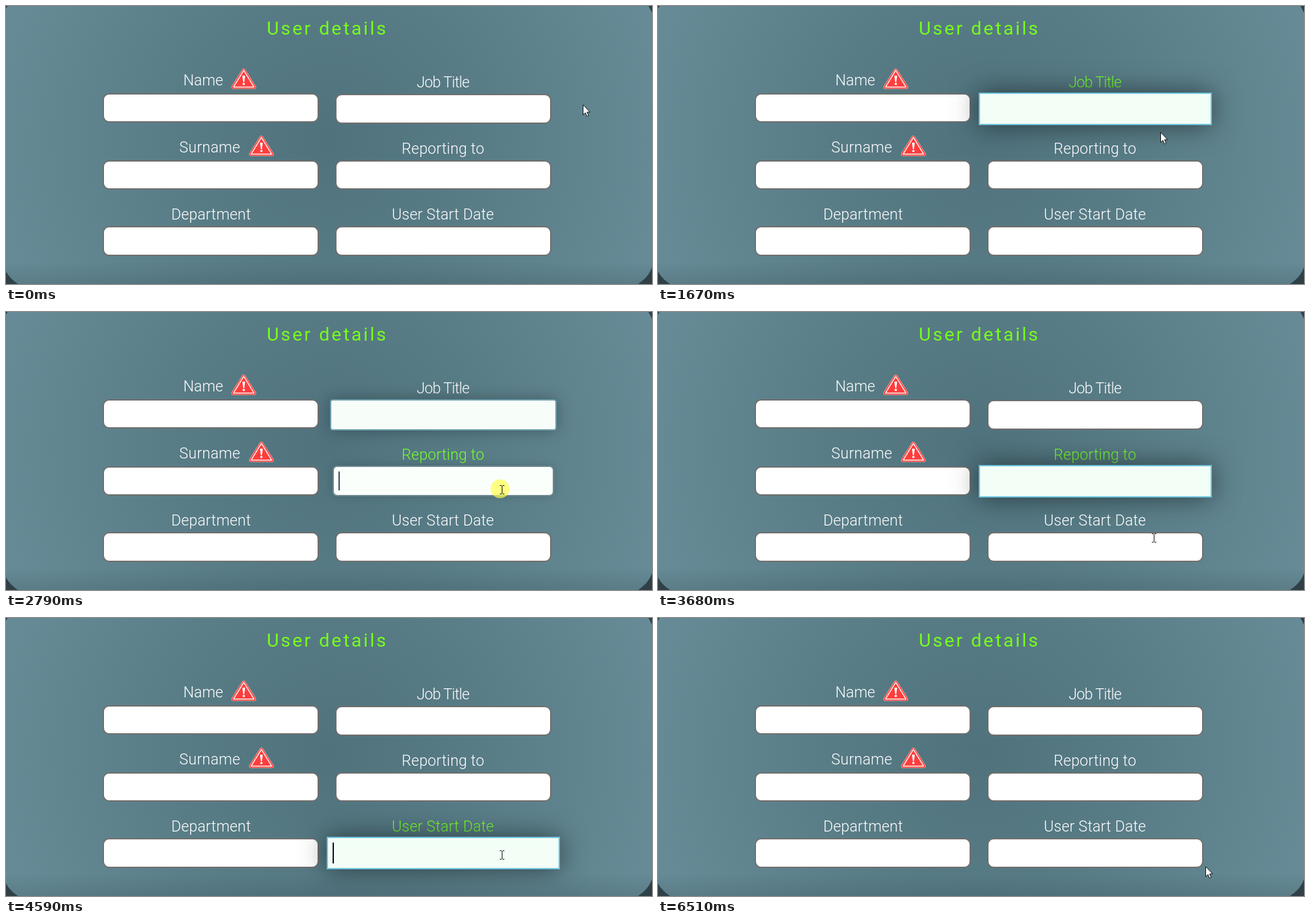
An HTML page that plays this animation: 989 px wide and 427 px high, repeating every 6540 ms.

```html
<!DOCTYPE html>
<html lang="en">
<head>
<meta charset="utf-8">
<title>User details</title>
<style>
@property --f { syntax: "<number>"; inherits: true; initial-value: 0; }

html, body { margin: 0; width: 100%; height: 100%; overflow: hidden; background: #2f4047; }
body { position: relative; font: 300 23px/28px Roboto, "Open Sans", sans-serif; color: #fff; --loop: 6540ms; }
body * { position: absolute; box-sizing: border-box; }

.panel {
  left: -6px; top: -22px; width: 998px; height: 456px; border-radius: 50px;
  background:
    linear-gradient(transparent 415px, rgba(30, 50, 60, .2)),
    radial-gradient(circle 510px at 501px 227px, #4f727d, #587c86 45%, #668b96);
}
h1 {
  margin: 0; left: 0; top: 18px; width: 984px; text-align: center;
  font-size: 28.5px; line-height: 34px; font-weight: 400; letter-spacing: 3px; color: #77ff1c;
}
.label { width: 300px; text-align: center; white-space: nowrap; }

/* --f runs from 0 (idle) to 1 (focused) */
.field {
  left: calc(var(--x) - 13px * var(--f));
  top: calc(var(--y) - 2px * var(--f));
  width: calc(331px + 26px * var(--f));
  height: calc(var(--h, 45px) + (50px - var(--h, 45px)) * var(--f));
  border: 2px solid color-mix(in srgb, #6fc4de calc(var(--f) * 100%), #706e6d);
  border-radius: calc(10px - 10px * var(--f));
  background: color-mix(in srgb, #f2fef6 calc(var(--f) * 100%), #fff);
  box-shadow: 0 0 calc(40px * var(--f)) rgba(0, 0, 0, calc(.52 * var(--f)));
}
.left { --x: 148px; }
.right { --x: 504px; animation: var(--loop) ease infinite; }
.caret {
  left: 2%; top: 16%; width: 2px; height: 68%; opacity: 0;
  background: color-mix(in srgb, #0c1210 calc(var(--f) * 100%), #4f6874);
}
.caret, .live, .ring, .arrow, .beam { animation: var(--loop) step-end infinite; }

.job.right { animation-name: focus-job; }
.rep.right { animation-name: focus-rep; }
.date.right { animation-name: focus-date; }
.job.live { animation-name: label-job; letter-spacing: -.7px; }
.rep.live { animation-name: label-rep; }
.date.live { animation-name: label-date; }
.job .caret { animation-name: caret-job; }
.rep .caret { animation-name: caret-rep; }
.date .caret { animation-name: caret-date; }

@keyframes focus-job {
  0%, 16.896% { --f: 0; } 19.495%, 41.972% { --f: 1; } 44.725%, 100% { --f: 0; }
}
@keyframes focus-rep {
  0%, 42.125% { --f: 0; } 44.725%, 67.661% { --f: 1; } 70.413%, 100% { --f: 0; }
}
@keyframes focus-date {
  0%, 67.813% { --f: 0; } 70.336%, 92.737% { --f: 1; } 95.413%, 100% { --f: 0; }
}
@keyframes label-job { 0%, 41.82%, 100% { color: #fff; } 16.667% { color: #77ff2c; } }
@keyframes label-rep { 0%, 67.508%, 100% { color: #fff; } 41.82% { color: #77ff2c; } }
@keyframes label-date { 0%, 92.584%, 100% { color: #fff; } 67.508% { color: #77ff2c; } }
@keyframes caret-job { 0%, 23.7%, 39.297%, 100% { opacity: 0; } 16.82%, 31.422% { opacity: 1; } }
@keyframes caret-rep { 0%, 49.083%, 64.832%, 100% { opacity: 0; } 42.049%, 56.957% { opacity: 1; } }
@keyframes caret-date { 0%, 75.229%, 90.673%, 100% { opacity: 0; } 67.737%, 83.028% { opacity: 1; } }

.icon { width: 38px; height: 32px; }

.mouse { left: 0; top: 0; width: 0; height: 0; animation: move var(--loop) linear infinite; }
.mouse svg { overflow: visible; }
.ring {
  left: -17px; top: -16px; width: 29px; height: 29px; border-radius: 50%;
  background: rgba(255, 255, 70, .68); opacity: 0; animation-name: press;
}
.arrow { left: 0; top: 0; width: 12px; height: 20px; animation-name: arrow; }
.beam { left: -4px; top: -8px; width: 8px; height: 16px; opacity: 0; animation-name: beam; }

@keyframes move {
  0%, 4.587% { transform: translate(883px, 151px); animation-timing-function: ease-in; }
  8.563% { transform: translate(835px, 146px); animation-timing-function: ease-out; }
  12.538%, 23.5% { transform: translate(777px, 157px); }
  25.535% { transform: translate(769px, 193px); animation-timing-function: ease-out; }
  32.722%, 51.5% { transform: translate(759px, 273px); animation-timing-function: ease-in-out; }
  56.269% { transform: translate(759px, 347px); animation-timing-function: ease-out; }
  59.021%, 80% { transform: translate(759px, 364px); animation-timing-function: ease-in-out; }
  86.697%, 97.6% { transform: translate(878px, 353px); }
  99.541%, 100% { transform: translate(838px, 381px); }
}
@keyframes press {
  0%, 18.196%, 43.425%, 69.113%, 94.19%, 100% { opacity: 0; }
  16.361%, 41.59%, 67.278%, 92.355% { opacity: 1; }
}
@keyframes arrow {
  0%, 25.076%, 52.752%, 83.945%, 100% { opacity: 1; }
  8.563%, 28.287%, 55.657% { opacity: 0; }
}
@keyframes beam {
  0%, 25.076%, 52.752%, 83.945%, 100% { opacity: 0; }
  8.563%, 28.287%, 55.657% { opacity: 1; }
}
</style>
</head>
<body>
<div class="panel"></div>
<h1>User details</h1>

<svg width="0" height="0">
  <symbol id="warn" viewBox="0 0 38 32">
    <g stroke-linejoin="round" fill="#ff3d3d">
      <path d="M19 3.2 35 28.6H3Z" stroke="#f79a94" stroke-width="6"/>
      <path d="M19 3.2 35 28.6H3Z" stroke="#fb4640" stroke-width="4.4"/>
      <path d="M19 2.8 34.6 28.4H3.4Z" stroke="#fff0ee" stroke-width="1.5"/>
    </g>
    <path d="M16.9 11.6q2.1-1.6 4.2 0L19.8 21h-1.6Z" fill="#fff"/>
    <circle cx="19" cy="23.7" r="1.8" fill="#fff"/>
  </symbol>
</svg>

<span class="label" style="left:152px;top:101px">Name</span>
<svg class="icon" style="left:345px;top:96px"><use href="#warn"/></svg>
<div class="field left" style="--y:134px"></div>

<span class="label" style="left:162px;top:204px;letter-spacing:.3px">Surname</span>
<svg class="icon" style="left:372px;top:199px"><use href="#warn"/></svg>
<div class="field left" style="--y:237px"></div>

<span class="label" style="left:164px;top:307px;letter-spacing:.2px">Department</span>
<div class="field left" style="--y:338px;--h:46px"></div>

<span class="label live job" style="left:519px;top:104px">Job Title</span>
<div class="field right job" style="--y:135px;--h:46px"><i class="caret"></i></div>

<span class="label live rep" style="left:519px;top:206px;letter-spacing:.2px">Reporting to</span>
<div class="field right rep" style="--y:237px"><i class="caret"></i></div>

<span class="label live date" style="left:519px;top:307px;letter-spacing:.2px">User Start Date</span>
<div class="field right date" style="--y:338px;--h:46px"><i class="caret"></i></div>

<div class="mouse">
  <div class="ring"></div>
  <svg class="arrow" viewBox="0 0 12 20">
    <path d="M.5.8V16.2L4 12.9 6.4 18.6 8.9 17.5 6.5 12H11.2Z" fill="#fff" stroke="#111" stroke-width="1"/>
  </svg>
  <svg class="beam" viewBox="0 0 8 16">
    <path d="M1 1.5H3.5L4.5 2.5 5.5 1.5H8M4.5 2V14M1 14.5H3.5L4.5 13.5 5.5 14.5H8" fill="none" stroke="#111" stroke-width="1"/>
  </svg>
</div>
</body>
</html>
```
